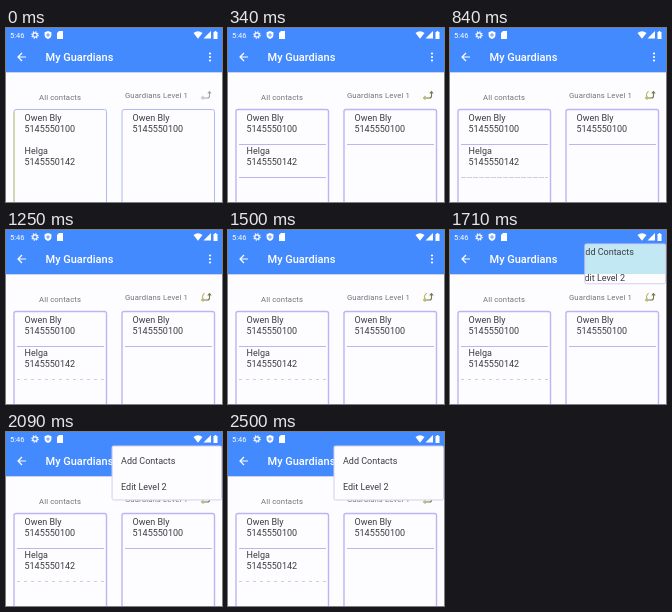
Animation of 216 by 174 pixels, one loop 2.54 s. Source, as an HTML page:

```html
<!DOCTYPE html>
<html lang="en">
<head>
<meta charset="utf-8">
<title>My Guardians</title>
<style>
  html, body { margin: 0; width: 100%; height: 100%; overflow: hidden; background: #fdfcff; }
  svg { display: block; width: 100%; height: 100%; font-family: Roboto, sans-serif; }
  .label { font-size: 7.7px; letter-spacing: .13px; fill: #747478; }
  .row { font-size: 9px; fill: #3c3c40; }
  .line { fill: none; stroke: #bdb5f2; stroke-width: 1.3; }
  .icon { fill: none; stroke: #fff; stroke-width: 1.2; }
</style>
</head>
<body>
<svg viewBox="0 0 216 174">
  <defs>
    <clipPath id="reveal"><rect id="revealBox" width="0" height="0"/></clipPath>
  </defs>
  <rect width="216" height="174" fill="#fdfcff"/>
  <rect width="216" height="44" fill="#448aff"/>
  <rect y="44" width="216" height="1" fill="#c9d5ee"/>

  <!-- status bar -->
  <g fill="#fff">
    <text x="4" y="10" font-size="7.5">5:46</text>
    <circle cx="29" cy="7" r="2.2" class="icon"/>
    <circle cx="29" cy="7" r="3.2" class="icon" stroke-dasharray="1.2 1.3"/>
    <path d="M42 3l3.4 1.3v2.6q0 2.7-3.4 4.2q-3.4-1.5-3.4-4.2V4.3z"/>
    <path d="M42 5v4M40 7h4" stroke="#448aff" stroke-width=".8"/>
    <path d="M53 3h4v8h-6V5z"/>
    <path d="M187.500 5q4.500-3.500 9 0l-4.500 5.700z"/>
    <path d="M205 3v7.500h-7.500z"/>
    <path d="M207.500 4h1.200v-1h1.600v1h1.200v7h-4z"/>
  </g>

  <!-- app bar -->
  <path class="icon" d="M20 29h-8M16 25l-4 4l4 4"/>
  <text x="39.500" y="33" font-size="11" font-weight="500" fill="#fff">My Guardians</text>
  <g fill="#fff">
    <circle cx="204" cy="25.500" r="1.100"/>
    <circle cx="204" cy="29" r="1.100"/>
    <circle cx="204" cy="32.500" r="1.100"/>
  </g>

  <!-- lists -->
  <text class="label" x="33" y="72">All contacts</text>
  <text class="label" x="119" y="70">Guardians Level 1</text>
  <g id="swap" fill="none" stroke-width="1.1">
    <path d="M197 70h4.500q2 0 2-2v-4M201.800 65.500l1.700-2l1.700 2"/>
    <path id="swapTip" d="M197.500 68l-2 2l2 1.500"/>
    <path id="swapLeft" d="M196.500 68v-2l2-3" stroke="#b9bb62"/>
  </g>
  <path id="leftBox" class="line" d="M8 175V83.500q0-2 2-2h88.500q2 0 2 2V175"/>
  <path id="rightBox" class="line" d="M116 175V83.500q0-2 2-2h88.500q2 0 2 2V175"/>
  <path id="leftEdge" class="line" d="M8 175V84" stroke-width=".9" style="stroke:#d3d38e"/>
  <g id="dividers">
    <path class="line" d="M11 116.500h87M119 116.500h87" style="stroke-width:1"/>
    <path id="lowDivider" class="line" d="M11 149.500h87" style="stroke-width:1"/>
  </g>
  <g id="rows" class="row"></g>

  <!-- overflow menu -->
  <g clip-path="url(#reveal)">
    <rect id="panel" fill="#fdfcff"/>
    <rect id="tint" fill="#c2e8f3"/>
    <g id="items" class="row">
      <text x="115" y="32">Add Contacts</text>
      <text x="115" y="58">Edit Level 2</text>
    </g>
  </g>
  <rect id="edge" fill="none" stroke="#d2cff0" rx="1.500"/>
</svg>
<script>
const LOOP = 2540, STEP = 40, MENU_START = 1670;
const MENU = { left: 106, right: 215.5, top: 14, bottom: 68 };
const $ = id => document.getElementById(id);

function set(id, attrs) {
  for (const key in attrs) $(id).setAttribute(key, attrs[key]);
}

function contact(x, y, name, phone) {
  return `<text x="${x}" y="${y}">${name}</text><text x="${x}" y="${y + 10.5}">${phone}</text>`;
}
$('rows').innerHTML =
  contact(18.5, 93, 'Owen Bly', '5145550100') +
  contact(18.5, 126, 'Helga', '5145550142') +
  contact(126.5, 93, 'Owen Bly', '5145550100');

function drawLists(t) {
  const ready = Math.min(1, Math.floor(t / STEP) / 3);
  const first = ready === 0;
  for (const id of ['leftBox', 'rightBox']) {
    $(id).style.stroke = first ? '#a3b5ee' : '#bdb5f2';
    $(id).style.strokeWidth = first ? .9 : 1.4;
  }
  set('leftEdge', { opacity: 1 - ready });
  set('dividers', { opacity: ready });

  const low = $('lowDivider').style;
  low.stroke = t < 590 ? '#bdb5f2' : '#cfcdd8';
  low.strokeDasharray = t < 590 ? 'none' : t < 1130 ? '5 1' : '3 4';

  set('swap', { stroke: first ? '#a5a5a5' : '#77774c' });
  set('swapTip', { stroke: first ? '#c5c5c5' : '#b9b24f' });
  set('swapLeft', { opacity: t < 590 ? 0 : 1 });
}

// The menu grows out of its top right corner while its contents slide into place.
function drawMenu(t) {
  const open = t >= MENU_START;
  $('items').style.display = $('edge').style.display = open ? '' : 'none';
  if (!open) return set('revealBox', { width: 0, height: 0 });

  const age = Math.floor((t - MENU_START) / STEP) * STEP;
  const rest = Math.exp(-(age + 40) / 60);
  const fullWidth = MENU.right - MENU.left, fullHeight = MENU.bottom - MENU.top;
  const x = MENU.left + fullWidth * rest;
  const box = { x, y: MENU.top, width: MENU.right - x, height: fullHeight * (1 - rest) };
  set('revealBox', box);
  set('panel', box);
  set('edge', box);
  set('tint', { ...box, height: Math.min(box.height, 30), opacity: age < 80 ? 1 : 0 });
  set('items', { transform: `translate(${fullWidth / 2 * rest} ${-fullHeight / 2 * rest})` });
}

function frame() {
  const t = performance.now() % LOOP;
  drawLists(t);
  drawMenu(t);
  requestAnimationFrame(frame);
}
frame();
</script>
</body>
</html>
```
